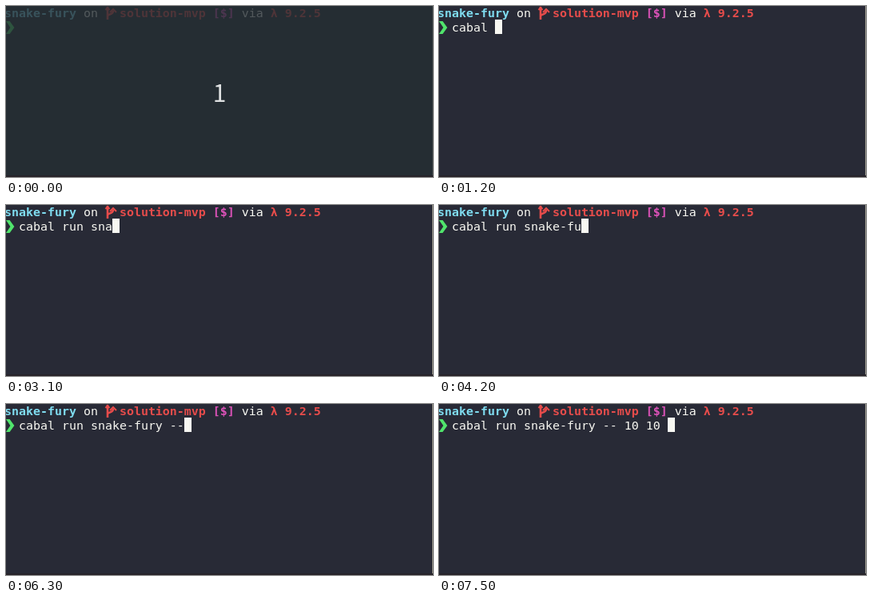
Recreate the animation shown at these times as an HTML page. Size 534 by 214 pixels, loop 8000 ms.

```html
<!DOCTYPE html>
<html lang="en">
<head>
<meta charset="utf-8">
<title>Terminal</title>
<style>
  html, body { margin: 0; width: 100%; height: 100%; overflow: hidden; background: #282a36; }
  #stage { position: relative; width: 534px; height: 214px; overflow: hidden; background: #282a36; }
  .row {
    position: absolute; height: 18px; white-space: pre; color: #f8f8f2;
    font: 14.95px/18px "DejaVu Sans Mono", monospace;
  }
  #head { left: -2px; top: 0; }
  #typed { left: 16px; top: 18px; }
  .dir { color: #7fdcf0; }
  .git { color: #e64c4b; }
  .flag { color: #dc52b8; }
  #cursor { position: absolute; left: 0; top: 17px; width: 9px; height: 18px; background: #f8f8f2; }
  svg { position: absolute; left: 0; top: 0; }
  #side { position: absolute; right: 0; top: 0; width: 1px; height: 212px; background: #98958a; }
  #veil {
    position: absolute; inset: 0; background: rgba(37, 46, 51, .79); color: #dfe1e2;
    font: 30px/214px "Noto Sans CJK SC", "Noto Sans CJK JP", sans-serif; text-align: center;
  }
  #edge { position: absolute; left: 0; top: 212px; width: 534px; height: 2px; background: #272329; }
</style>
</head>
<body>
<div id="stage">
  <div class="row" id="head"><b class="dir">snake-fury</b> on   <b class="git">solution-mvp</b> <b class="flag">[$]</b> via <b class="git">λ 9.2.5</b></div>
  <svg width="534" height="40" fill="none">
    <g stroke="#e64c4b" stroke-width="2.6">
      <path d="M127 1V17M127 13C127 9 134 12 134 6"/>
      <path d="M130 8L134 4L138 8M124.5 5L127 2L129.5 5" stroke-width="2"/>
    </g>
    <path d="M0 19H4.6L10.4 27L4.6 35H0L5.4 27Z" fill="#50e46c"/>
  </svg>
  <div class="row" id="typed"></div>
  <div id="cursor"></div>
  <div id="side"></div>
  <div id="veil">1</div>
  <div id="edge"></div>
</div>
<script>
  const LOOP = 8000, CELL = 9, LEFT = 16, VEIL_END = 100, IDLE = 600;

  // Bursts of typing: text, time of its first key, time of its last key
  const bursts = [
    ["ca", 300, 400], ["b", 700, 700], ["al ", 1000, 1200],
    ["r", 1800, 1800], ["un s", 2100, 2400], ["nake-f", 2900, 3900],
    ["ury", 4200, 4600], [" ", 5300, 5300], ["-- ", 6100, 6500], ["10 10 ", 6800, 7500]
  ];
  const command = bursts.map(b => b[0]).join("");
  const keys = bursts.flatMap(([text, first, last]) =>
    [...text].map((_, i) => first + (last - first) * i / Math.max(1, text.length - 1)));

  const [typed, cursor, veil] = ["typed", "cursor", "veil"].map(id => document.getElementById(id));
  const show = (el, on) => { el.style.visibility = on ? "visible" : "hidden"; };
  const start = performance.now();

  function draw(t) {
    const count = keys.filter(k => k <= t).length;
    const lastKey = count ? keys[count - 1] : VEIL_END;
    typed.textContent = command.slice(0, count);
    cursor.style.transform = `translateX(${LEFT + CELL * count}px)`;
    show(cursor, t >= VEIL_END && t - lastKey < IDLE);
    show(veil, t < VEIL_END);
  }

  function tick(now) {
    draw(Math.max(0, now - start) % LOOP);
    requestAnimationFrame(tick);
  }

  draw(0);
  requestAnimationFrame(tick);
</script>
</body>
</html>
```
